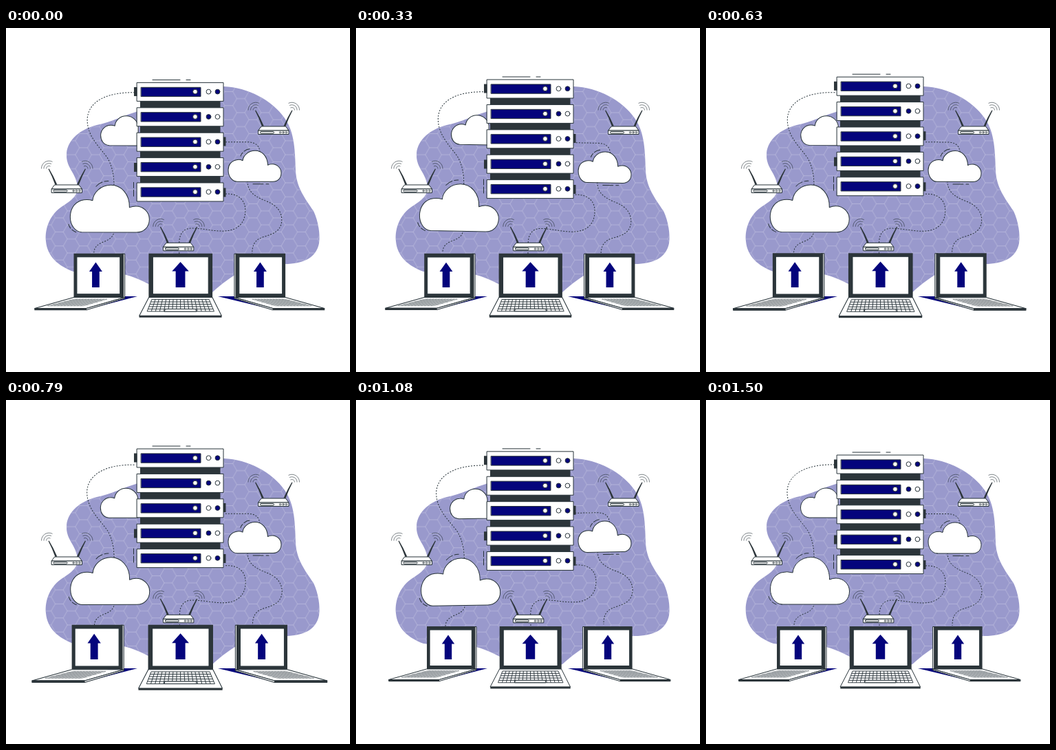
Recreate the animation shown at these times as an HTML page. Size 500 px wide and 500 px high, loop 1540 ms.

```html
<!DOCTYPE html>
<html lang="en">
<head>
<meta charset="utf-8">
<title>Cloud servers</title>
<style>
html, body { margin: 0; width: 100%; height: 100%; overflow: hidden; background: #fff; }
svg { display: block; width: 100%; height: 100%; }
.line { fill: #fff; stroke: #263238; stroke-width: 1; stroke-linejoin: round; stroke-linecap: round; }
.open { fill: none; }
.cable { fill: none; stroke-dasharray: 2 2; stroke-linecap: butt; }
.dark { fill: #2c353a; }
.navy { fill: #04047c; }
.keys { fill: none; stroke: #263238; }
.wave { fill: none; stroke: #263238; stroke-width: .6; }
</style>
</head>
<body>
<svg viewBox="0 0 500 500">
  <defs>
    <pattern id="hex" width="35.2" height="20.4" patternUnits="userSpaceOnUse" x="7" y="0.6">
      <path d="M0 10.2H5.9L11.7 0H23.4L29.3 10.2H35.2M5.9 10.2L11.7 20.4H23.4L29.3 10.2"
        fill="none" stroke="#fff" stroke-width=".7" opacity=".36"/>
    </pattern>
    <path id="blob" d="M317 85C351 86 387 105 405 131C420 152 420 180 421 207C422 232 435 248 447 266
      C454 281 457 300 455 313C451 334 432 343 405 343C350 343 330 358 300 384C270 392 235 386 207 372
      C190 363 172 356 150 355C130 356 113 356 98 354C76 346 60 332 58 310C56 290 65 270 82 259
      C98 249 107 241 103 225C99 208 87 202 88 182C90 162 108 147 132 141C153 137 171 127 192 121
      C230 108 255 86 317 85Z"/>
    <g id="router">
      <path class="line" d="M71 228H106L110.5 234H66.5Z"/>
      <path class="line" d="M66.5 234H110.5V239.5H66.5Z"/>
      <rect class="line" x="69" y="235.5" width="20" height="2.6" rx="1.2" stroke-width=".8"/>
      <g class="line" style="stroke-width:.8">
        <circle cx="98" cy="236.8" r="1.2"/><circle cx="102.4" cy="236.8" r="1.2"/><circle cx="106.8" cy="236.8" r="1.2"/>
      </g>
      <path class="dark" d="M61.5 205L62.6 204.5L68.5 215L74.3 227.5L71.5 228L66.8 216Z"/>
      <path class="dark" d="M116 205L114.9 204.5L109 215L103 227.5L105.8 228L110.7 216Z"/>
      <path id="waves" class="wave" d="M58.5 204.5A4 4 0 0 1 64.5 201M55 204.5A7.5 7.5 0 0 1 66 197.6M51.5 204.5A11 11 0 0 1 67.5 194.4"/>
      <use href="#waves" transform="matrix(-1 0 0 1 177.5 0)"/>
    </g>
    <g id="sideLaptop">
      <path class="line" d="M171 329.5H175V391H171Z"/>
      <path class="dark" d="M103 329H173.5V391H103Z"/>
      <path class="line" d="M107.3 334H168.3V386.5H107.3Z" stroke-width=".6"/>
      <path class="line" d="M103 391H175L121 406.5H48Z"/>
      <path class="line" d="M48 406.5H121L175 391V392.5L121 408.7H48Z"/>
      <path class="dark" d="M48 406.3H121L121 408.9H48Z"/>
    </g>
    <path id="arrow" class="navy" d="M0 0L9.2 13H5.2V35.5H-5.2V13H-9.2Z"/>
  </defs>

  <use href="#blob" fill="#9999cc"/>
  <use href="#blob" fill="url(#hex)"/>

  <g id="sky">
    <path class="line cable" d="M187 94C150 93 120 105 118 132C117 158 138 175 148 190C155 203 157 215 157 230"/>
    <path class="line cable" d="M157 295C157 304 150 308 142 311C132 315 128 320 128 328"/>
    <path class="line cable" d="M319 165.5H350C362 165.5 369 170 369 182"/>
    <path class="line cable" d="M351 222C351 240 365 246 380 252C395 258 401 268 401 279C400 300 380 300 368 306C360 311 358 318 358 328"/>
    <path class="line cable" d="M319 241C338 240 348 250 348 265C348 285 335 295 315 295C300 295 285 291 270 291C258 291 252 300 252 312V328"/>
    <path class="line" d="M192 171H150C141 170 137.5 163 137.5 156C138 147 145 141.5 152 141.5Q155 141.3 158 142.5C159 134 166 128 174.5 128C184 128 191 135 192 143Z"/>
    <path class="line" d="M110 297H190C201 297 208.5 289 208.5 278C208.5 267 199 259 189 259Q184 259 179.5 261C180 241 167 228.5 152.5 228.5C138 228.5 127 239 126 251Q118 248.5 109 251C98 255 93.5 265 93.5 275C93.5 287 101 296.5 110 297Z"/>
    <path class="line" d="M336 223H388C395 223 400 218 400 210.5C400 203 394 197.5 387 197.5Q383 197.5 380.5 199C380 186 372 178 362 178C353 178 345 184 344 192.5Q340 190.5 335 191.5C327 193 323 199 323 206C323 216 329 223 336 223Z"/>
    <path class="line open" d="M131 230.5Q135 226 140 224.3M143 223.3Q146 222.5 149 222.7M91 285.5Q92 289 94 291.5M96 293.5Q99 296 102 297M341 186Q342 183 344 181M346 179Q350 175.8 354 175.5M359 226.5H374M378 226.5H382"/>
  </g>

  <g id="server">
    <path class="line open" d="M213 76H253M262 76H268M185.5 225V233M185.5 236V245"/>
    <path class="dark" d="M186 86.5H191V99.5H186ZM186 196.5H191V209.5H186ZM315 159H319.5V172H315ZM315 233H319.5V246H315ZM195 100H311.5V240H195Z"/>
  </g>

  <use href="#router"/>
  <use href="#router" x="300.5" y="-85"/>
  <use href="#router" x="162.3" y="84.3"/>

  <path class="navy" d="M150 390H191L118 409ZM354 390H308L387 409Z"/>
  <g id="laptops">
    <g id="left"><use href="#sideLaptop"/></g>
    <use href="#left" transform="matrix(-1 0 0 1 504.6 0)"/>
    <path class="dark" d="M208.7 329H298.7V391.5H208.7Z"/>
    <path class="line" d="M214.5 334H293V386.5H214.5Z" stroke-width=".6"/>
    <path class="line" d="M209 391H298.5L311.5 417H195.5Z"/>
    <path class="dark" d="M195.3 416.8H311.7V419.5H195.3Z"/>
    <g id="center"></g>
    <path class="line" d="M232 407.4H275L276 410.8H231Z" stroke-width=".8"/>
    <use href="#arrow" x="134" y="341.5"/>
    <use href="#arrow" x="366" y="341.5"/>
    <use href="#arrow" transform="translate(253.5 341) scale(1.29 1.01)"/>
  </g>
</svg>
<script>
const $ = id => document.getElementById(id);
const add = (id, markup) => $(id).insertAdjacentHTML('beforeend', markup);
const mix = (a, b, k) => a + (b - a) * k;

// Keyboard grid between a top edge and a bottom edge
function keyboard(id, [x1, x2, top], [x3, x4, bottom], rows, cols, weight) {
  let d = '';
  for (let r = 0; r <= rows; r++) {
    const k = r / rows;
    d += `M${mix(x1, x3, k)} ${mix(top, bottom, k)}H${mix(x2, x4, k)}`;
  }
  for (let c = 0; c <= cols; c++) {
    const k = c / cols;
    d += `M${mix(x1, x2, k)} ${top}L${mix(x3, x4, k)} ${bottom}`;
  }
  add(id, `<path class="keys" stroke-width="${weight}" d="${d}"/>`);
}
keyboard('left', [104, 150, 393.5], [66, 117, 403], 5, 11, .36);
keyboard('center', [213, 294, 394], [206.5, 301, 410.8], 5, 16, .9);

for (let row = 0; row < 5; row++) {
  const y = 80 + 36.4 * row;
  const lamp = (x, lit) => `<circle class="line" cx="${x}" cy="${y + 13.2}" r="3.4" ${lit ? 'style="fill:#04047c"' : ''}/>`;
  add('server', `<rect class="line" x="190.5" y="${y}" width="125.5" height="27"/>
    <rect class="line" x="196.5" y="${y + 6.9}" width="86.5" height="13.3" style="fill:#04047c"/>`
    + lamp(275, false) + lamp(294.5, row % 2) + lamp(307.5, row % 2 === 0));
}

// Piecewise linear value at p through [position, value] stops
function track(p, stops) {
  const i = Math.max(1, stops.findIndex(s => s[0] >= p));
  const [a, from] = stops[i - 1], [b, to] = stops[i];
  return mix(from, to, (p - a) / (b - a));
}
const floating = [[0, 0], [.5, -10], [1, 0]];
const wind = [[0, 0], [.25, 1], [.75, -1], [1, 0]];
const beat = [[0, 1], [.1, 1.1], [.3, 1], [.4, 1], [.5, 1.1], [.6, 1], [1, 1]];

const LOOP = 1540, STEP = 1000 / 24;

function draw() {
  // The motion advances in steps of 1/24 s
  const step = Math.floor((performance.now() % LOOP + 4.9) / STEP) % 37;
  const p = Math.min(1, (step + 1.1) / 36.5);
  $('server').setAttribute('transform', `translate(0 ${track(p, floating)})`);
  $('sky').setAttribute('transform', `rotate(${track(p, wind)} 247.5 211)`);
  $('laptops').setAttribute('transform',
    `translate(252.3 374.5) scale(${track(p, beat)}) translate(-252.3 -374.5)`);
  requestAnimationFrame(draw);
}
draw();
</script>
</body>
</html>
```
